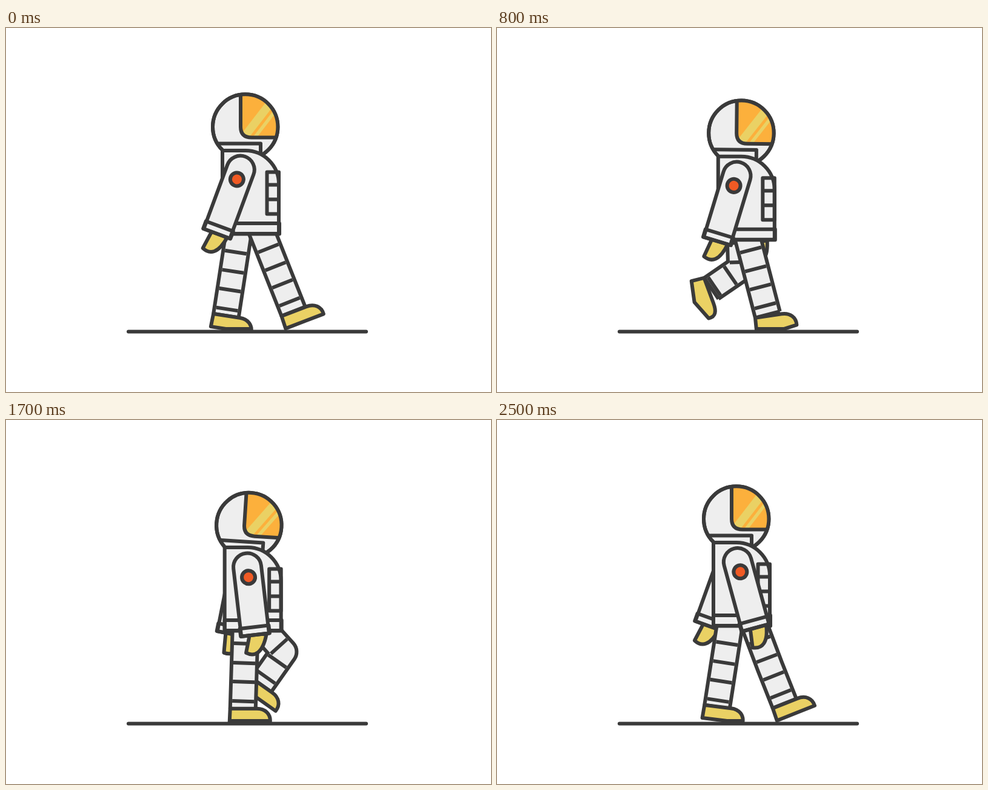
These frames come from a looping animation (800 px wide and 600 px high, 2600 ms). An HTML page with a canvas:

```html
<!DOCTYPE html>
<html lang="en">
<head>
<meta charset="utf-8">
<title>Walking astronaut</title>
<style>
  html, body { margin: 0; width: 100%; height: 100%; overflow: hidden; background: #fff; }
  canvas { display: block; }
</style>
</head>
<body>
<canvas id="stage" width="800" height="600"></canvas>
<script>
const ctx = document.getElementById('stage').getContext('2d');
const INK = '#3a3a3a', SUIT = '#eeeeee', YELLOW = '#ead164', VISOR = '#fcb03c', RED = '#f15a24';
const LOOP = 2600, TICK = 100, FLOOR = 498, LEG = 66;
const STRIPES = [-46, -14, 17, 49];
const { PI, sin, cos } = Math;
const rad = d => d * PI / 180;

// Easing over part of the step, u runs from 0 to 1
const part = (u, a, b) => Math.min(1, Math.max(0, (u - a) / (b - a)));
const ease = (u, a = 0, b = 1) => (1 - cos(PI * part(u, a, b))) / 2;
const soft = v => v * v * v * (10 + v * (6 * v - 15));
const pulse = (u, a, b) => sin(PI * part(u, a, b)) ** 2;
const bump = (u, skew) => pulse(u ** skew, 0, 1);

function at(x, y, deg, draw) {
  ctx.save();
  ctx.translate(x, y);
  ctx.rotate(rad(deg));
  draw();
  ctx.restore();
}

function paint(fill) {
  ctx.fillStyle = fill;
  ctx.fill();
  ctx.stroke();
}

function line(...p) {
  ctx.beginPath();
  for (let i = 0; i < p.length; i += 2) ctx.lineTo(p[i], p[i + 1]);
  ctx.stroke();
}

function drawBoot(x, y, deg, roll, toe) {
  at(x, y, deg, () => {
    ctx.beginPath();
    ctx.moveTo(0, 0);
    ctx.lineTo(44, -toe * 0.3);
    ctx.bezierCurveTo(58, -toe * 0.4, 67, 9 - toe, 66, 21.5 - toe);
    ctx.lineTo(34, 21.5 + 7 * roll);
    ctx.lineTo(-1, 21.5);
    ctx.closePath();
    paint(YELLOW);
    // flat sole where the boot meets the floor
    ctx.clip();
    ctx.setTransform(1, 0, 0, 1, 0, 0);
    line(0, FLOOR - 2, 800, FLOOR - 2);
  });
}

function drawLeg({ hip, knee, shin, len, slide, boot, roll, toe }) {
  const [hx, hy] = hip, [kx, ky] = knee, s = rad(shin);
  const fx = kx - len * sin(s), fy = ky + len * cos(s);
  const thigh = Math.atan2(hx - kx, ky - hy) * 180 / PI;
  ctx.save();
  ctx.beginPath();
  ctx.rect(0, 0, 800, FLOOR);
  ctx.clip();
  for (const [w, c] of [[48, INK], [36, SUIT]]) {
    ctx.save();
    ctx.lineWidth = w;
    ctx.strokeStyle = c;
    line(hx, hy, kx, ky, fx, fy);
    ctx.restore();
  }
  for (const d of STRIPES) {
    at(kx, ky, d < 0 ? thigh : shin, () => line(-18, d + slide, 18, d + slide));
  }
  at(fx, fy, shin, () => line(-21, 0, 21, 0));
  drawBoot(fx - 21 * cos(s), fy - 21 * sin(s), boot, roll, toe);
  ctx.restore();
}

function drawArm(x, y, deg, wrist, badge) {
  at(x + 35.5, y + 16, deg, () => {
    at(0, 129, wrist, () => {
      ctx.beginPath();
      ctx.moveTo(-9, -4);
      ctx.lineTo(-9, 32);
      ctx.bezierCurveTo(6, 36, 18, 28, 18, -4);
      ctx.closePath();
      paint(YELLOW);
    });
    ctx.beginPath();
    ctx.moveTo(-23, 129);
    ctx.arc(0, 16.6, 23, PI, 0);
    ctx.lineTo(23, 129);
    ctx.closePath();
    paint(SUIT);
    ctx.strokeRect(-24, 116, 48, 13);
    if (badge) {
      ctx.beginPath();
      ctx.arc(0, 33.5, 11, 0, 7);
      paint(RED);
    }
  });
}

function drawHead(x, y, tilt) {
  const dome = () => { ctx.beginPath(); ctx.arc(37.7, -39, 53.7, 0, 7); };
  const visor = () => {
    ctx.beginPath();
    ctx.moveTo(30, -100);
    ctx.lineTo(30, -39);
    ctx.quadraticCurveTo(30, -21.5, 48, -21.5);
    ctx.lineTo(110, -21.5);
    ctx.lineTo(110, -100);
    ctx.closePath();
  };
  at(x, y, tilt, () => {
    dome();
    paint(SUIT);
    line(-7, -11.5, 63, -11.5, 63, 4);
    ctx.save();
    dome();
    ctx.clip();
    visor();
    ctx.fillStyle = VISOR;
    ctx.fill();
    ctx.save();
    ctx.clip();
    ctx.strokeStyle = YELLOW;
    ctx.lineWidth = 13.5;
    line(28, -12, 89, -91);
    ctx.lineWidth = 5.5;
    line(42, -7, 103, -86);
    ctx.restore();
    visor();
    ctx.stroke();
    ctx.restore();
    dome();
    ctx.stroke();
  });
}

function drawTorso(x, y) {
  at(x, y, 0, () => {
    ctx.beginPath();
    ctx.moveTo(0, 137);
    ctx.lineTo(0, 0);
    ctx.lineTo(38, 0);
    ctx.arc(38, 55, 55, -PI / 2, 0);
    ctx.lineTo(93, 137);
    ctx.closePath();
    paint(SUIT);
    ctx.strokeRect(73.5, 35.5, 19.5, 69);
    line(73.5, 56.5, 93, 56.5);
    line(73.5, 80.5, 93, 80.5);
    ctx.strokeRect(0, 120, 94, 17.5);
  });
}

function standingLeg(u) {
  const lean = -21.6 + 30.4 * ease(u), s = sin(rad(lean)), c = cos(rad(lean));
  const boot = -21 * (1 - ease(u, 0.15, 0.45)) + 7 * ease(u, 0.76, 1);
  const b = rad(boot);
  const x = 474 - 111 * (0.8 * ease(u) + 0.2 * u);
  const y = FLOOR - 21.5 * cos(b) - 30 * Math.abs(sin(b));
  const up = d => [x + d * s, y - d * c];
  return {
    hip: up(145), knee: up(LEG), shin: lean, len: LEG, slide: 6 * u,
    boot, roll: pulse(u, 0, 0.48), toe: 0
  };
}

function swingingLeg(u, x, y) {
  const push = pulse(u, 0, 0.62), roll = pulse(u, 0, 0.48);
  // fold back, swing through, kick out
  const shin = 8.8 + 54 * ease(u, 0, 0.42) - 34 * ease(u, 0.38, 0.8) - 50.4 * ease(u, 0.72, 1);
  return {
    hip: [x + 27 + 40 * ease(u, 0.1, 0.8), y + 135],
    knee: [373 + 77 * u ** 0.85 + 32 * pulse(u, 0.45, 1), 409 - 3 * u - 25 * sin(PI * u ** 1.6)],
    shin, len: LEG - 7 * push, slide: 6 - 6 * u,
    boot: shin + 18 * push, roll, toe: 13 * roll
  };
}

function draw(t) {
  const u = t / (LOOP - TICK);
  const x = 357 + 8 * bump(u, 0.7), y = 202 + 12.3 * bump(u, 0.92);
  const arm = 20.3 - 35.6 * soft(part(u, 0.1, 1));
  const flick = bump(u, 3);

  ctx.fillStyle = '#fff';
  ctx.fillRect(0, 0, 800, 600);
  ctx.strokeStyle = INK;
  ctx.lineWidth = 6;
  ctx.lineJoin = 'round';
  ctx.lineCap = 'butt';

  drawArm(x, y, 4.5 - arm, 8 - 20 * flick, false);
  drawLeg(swingingLeg(u, x, y));
  drawLeg(standingLeg(u));
  drawHead(x, y, 3.7 * bump(u, 1.8));
  drawTorso(x, y);
  drawArm(x, y, arm, 8 + 14 * flick, true);

  ctx.lineCap = 'round';
  line(202, 500.5, 594, 500.5);
}

const start = performance.now();
function tick() {
  const t = (performance.now() - start) % LOOP;
  draw(Math.floor(t / TICK) * TICK);
  requestAnimationFrame(tick);
}
tick();
</script>
</body>
</html>
```
